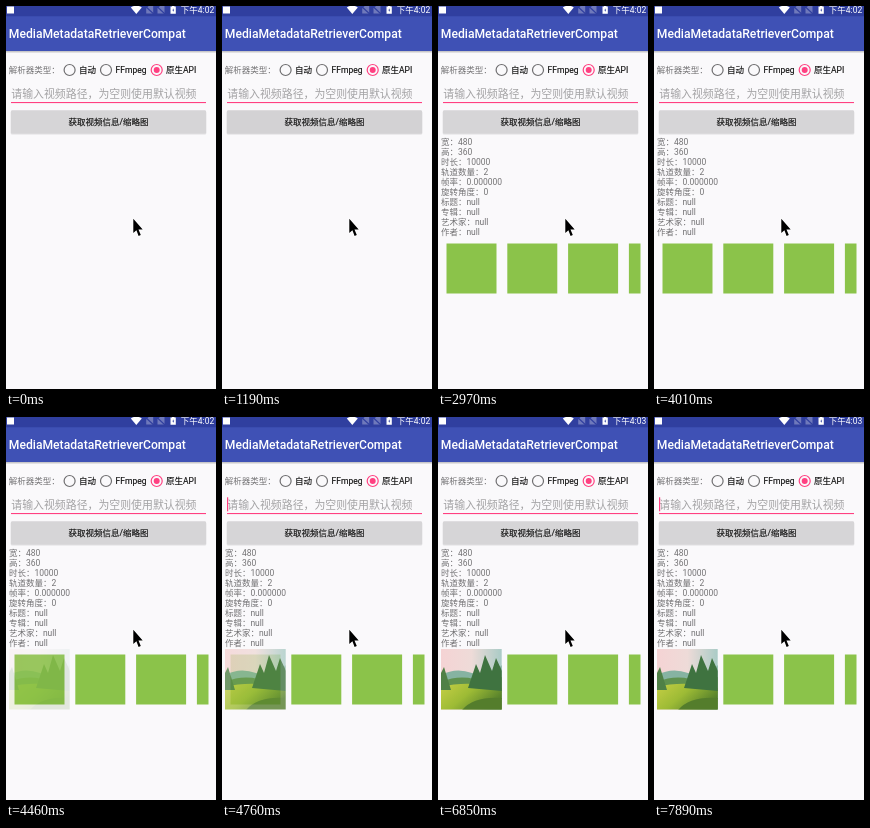
An HTML page for the animation above (8000 ms loop, 210 by 383 pixels).

```html
<!DOCTYPE html>
<html lang="zh-CN">
<head>
<meta charset="utf-8">
<title>MediaMetadataRetrieverCompat</title>
<style>
html, body { margin: 0; width: 100%; height: 100%; overflow: hidden; background: #faf9fb; }
svg { display: block; width: 100vw; height: 100vh; }
text { font: 8.5px Roboto, "Noto Sans CJK SC", "Noto Sans CJK", sans-serif; white-space: pre; }
.title { font-size: 12.15px; font-weight: 500; fill: #fff; }
.hint { font-size: 10.9px; fill: #a3a2a4; }
.soft { fill: #737274; }
.dark { fill: #111; stroke: #111; stroke-width: .15; }
</style>
</head>
<body>
<svg viewBox="0 0 210 383" preserveAspectRatio="none">
  <defs>
    <linearGradient id="barShadow" x2="0" y2="1">
      <stop stop-color="#000" stop-opacity=".25"/>
      <stop offset="1" stop-color="#000" stop-opacity="0"/>
    </linearGradient>
    <linearGradient id="sky">
      <stop stop-color="#f5d3d4"/>
      <stop offset=".5" stop-color="#eedbd8"/>
      <stop offset="1" stop-color="#a9cbc6"/>
    </linearGradient>
    <linearGradient id="meadow" x2="1" y2=".5">
      <stop stop-color="#c6cf45"/>
      <stop offset=".5" stop-color="#9dbb35"/>
      <stop offset="1" stop-color="#547f2b"/>
    </linearGradient>
    <clipPath id="list"><path d="M3 231H202.5V293H3z"/></clipPath>
    <clipPath id="photoBox"><path d="M3 232H63.7V292.5H3z"/></clipPath>
  </defs>

  <rect width="210" height="383" fill="#faf9fb"/>
  <rect y="45" width="210" height="2.5" fill="url(#barShadow)"/>
  <rect y="10" width="210" height="35" fill="#3f51b5"/>
  <rect width="210" height="10.3" fill="#303f9f"/>

  <!-- status bar -->
  <rect x="1" y="0.5" width="7" height="7" fill="#fff"/>
  <path d="M124.8 1.5Q130.3 -2.2 135.8 1.5L130.3 8z" fill="#fff"/>
  <g id="sims"></g>
  <path d="M164.5 0.5H166V-1H168.4V0.5H169.8V7.8H164.5z" fill="#fff"/>
  <path d="M167.5 2.2L166.3 4.4H167.1V6L168.2 3.8H167.5z" fill="#303f9f"/>
  <text id="clock" x="208.2" y="6.8" text-anchor="end" fill="#fff"></text>

  <text class="title" x="2.8" y="32.3">MediaMetadataRetrieverCompat</text>

  <text class="soft" x="2.7" y="67.2">解析器类型：</text>
  <g id="radios"></g>

  <text class="hint" x="5.3" y="91.6">请输入视频路径，为空则使用默认视频</text>
  <rect x="5" y="96" width="195" height="1.1" fill="#ff4081"/>
  <rect id="caret" x="5" y="80.3" width="1.2" height="14" fill="#ff4081"/>

  <rect id="shade" x="4.6" y="105" width="195.8" height="23.5" rx="1.6"/>
  <rect id="button" x="5" y="104.2" width="195" height="23.2" rx="1.2"/>
  <text class="dark" x="102.5" y="119" text-anchor="middle" font-weight="500">获取视频信息/缩略图</text>

  <g id="result">
    <g id="info"></g>
    <g clip-path="url(#list)">
      <g id="thumbs" fill="#8bc34a"></g>
      <g id="photo" clip-path="url(#photoBox)">
        <rect x="3" y="232" width="61" height="61" fill="url(#sky)"/>
        <path d="M3 258Q18 250 34 256T64 248V276H3z" fill="#86b3a2"/>
        <path d="M3 265Q20 258 36 262T64 260V282H3z" fill="#5f9150"/>
        <path d="M3 270Q30 263 64 271V293H3z" fill="url(#meadow)"/>
        <path d="M47 238L54 254L58 241L64 254V274L30 271L38 247L42 256z" fill="#3f7340"/>
        <path d="M6 250L3 256V273H13z" fill="#4f8046"/>
        <path d="M24 293Q36 279 64 281V293z" fill="#547d2c"/>
      </g>
    </g>
  </g>

  <path d="M127.3 212.8V227L130.4 224.3L132.6 230L134.8 229.1L132.5 223.5H136.7z"
        fill="#000" stroke="#fff" stroke-width="1.6" stroke-linejoin="round" paint-order="stroke"/>
</svg>
<script>
const LOOP = 8000;
const el = id => document.getElementById(id);

el('sims').innerHTML = [143.7, 155].map(x =>
  `<path d="M${x - 3.5} 7.5V2.5L${x - 1} 0H${x + 3.5}V7.5z" fill="#6f79bb"/>
   <path d="M${x - 4} 0.5L${x + 4} 8" stroke="#303f9f" stroke-width="1.1"/>`).join('');

const radios = [[63.6, 73, '自动'], [100, 109.6, 'FFmpeg'], [150.7, 160, '原生API']];
el('radios').innerHTML = radios.map(([cx, tx, label], i) => {
  const on = i === 2, color = on ? '#ff4081' : '#6f6e70';
  return `<circle cx="${cx}" cy="64" r="5.5" fill="none" stroke="${color}" stroke-width="1.2"/>` +
    (on ? `<circle cx="${cx}" cy="64" r="3" fill="${color}"/>` : '') +
    `<text class="dark" x="${tx}" y="67.2">${label}</text>`;
}).join('');

const info = ['宽：480', '高：360', '时长：10000', '轨道数量：2', '帧率：0.000000',
  '旋转角度：0', '标题：null', '专辑：null', '艺术家：null', '作者：null'];
el('info').innerHTML = info.map((line, i) =>
  `<text class="soft" x="2.9" y="${139.4 + i * 10}">${line}</text>`).join('');

el('thumbs').innerHTML = [0, 1, 2, 3].map(i =>
  `<rect x="${8.5 + i * 60.8}" y="237.5" width="50" height="50"/>`).join('');

// Value of the last [time, value] step reached
function stepAt(steps, t, start) {
  let value = start;
  for (const [at, v] of steps) if (t >= at) value = v;
  return value;
}

const blinks = [450, 1040, 1630, 2070, 2520, 2970, 3560, 4010,
  4610, 5060, 5500, 5950, 6550, 6850, 7450];
const press = [[1190, .2], [1480, 1], [1630, .75], [1780, .5], [1930, .25], [2070, .1], [2220, 0]];
const fade = [[4460, .14], [4610, .5], [4760, .8], [4910, 1]];

function draw(t) {
  const p = stepAt(press, t, 0);
  const g = Math.round(214 - 15 * p);
  el('button').setAttribute('fill', `rgb(${g},${g - 1},${g + 1})`);
  el('shade').setAttribute('fill-opacity', .1 + .1 * p);
  const lit = blinks.filter(b => t >= b).length % 2;
  el('caret').setAttribute('opacity', lit);
  el('result').setAttribute('visibility', t >= 1480 ? 'visible' : 'hidden');
  el('photo').setAttribute('opacity', stepAt(fade, t, 0));
  el('clock').textContent = t < 5360 ? '下午4:02' : '下午4:03';
}

function tick(now) {
  draw(now % LOOP);
  requestAnimationFrame(tick);
}
draw(0);
requestAnimationFrame(tick);
</script>
</body>
</html>
```
